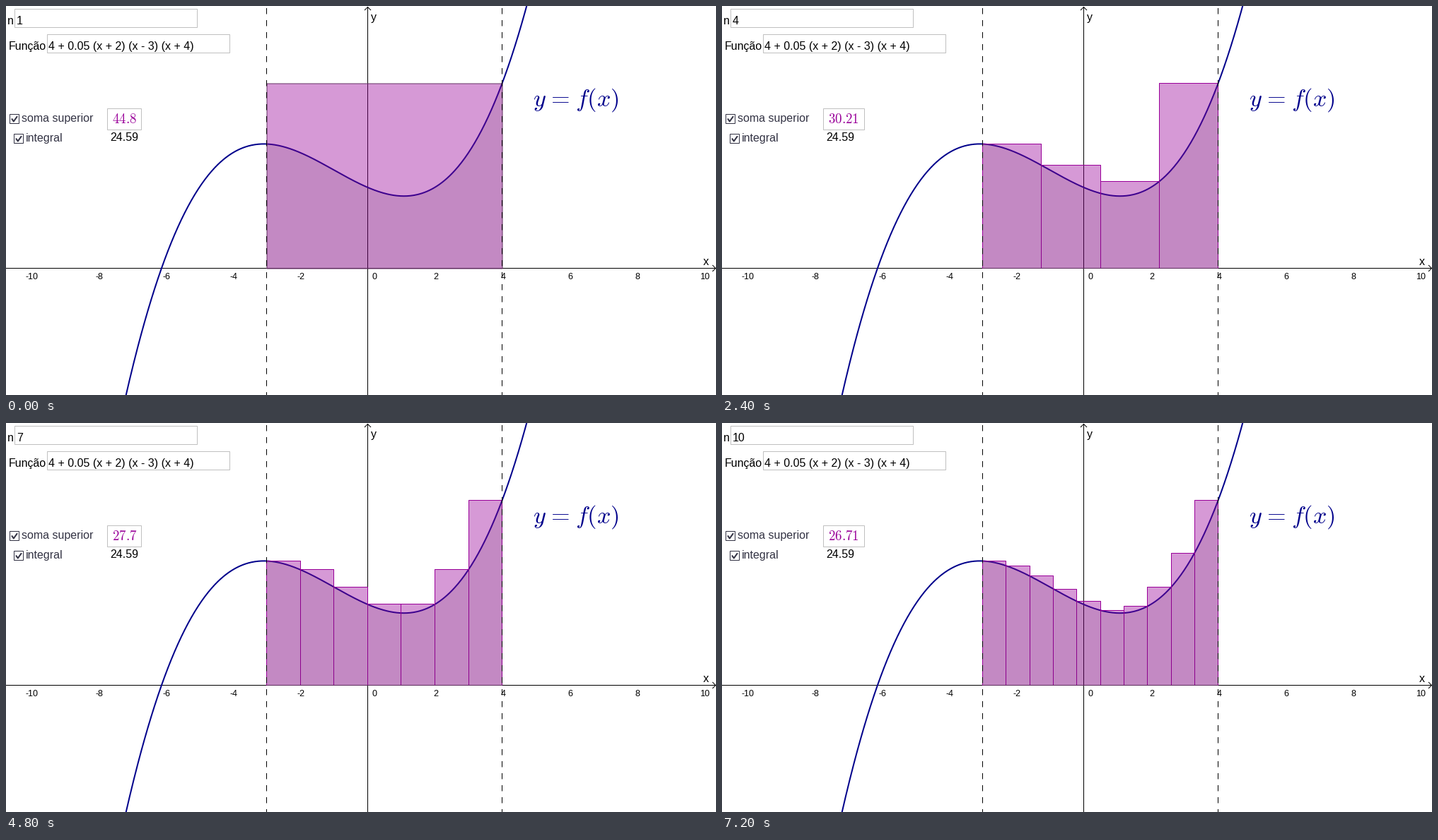
Write a matplotlib script that moves like this. It is 1004 px wide and 551 px high and loops after 8000 ms.

```python
import numpy as np
import matplotlib.pyplot as plt
from matplotlib.animation import FuncAnimation
from matplotlib.collections import PolyCollection
from matplotlib.patches import Rectangle

W, H, DPI = 1004, 551, 64
PX = 72 / DPI                      # points per pixel
OX, OY = 511.3, 371.5              # origin of the plot
SX, SY = 333 / 7, 262 / 6.4        # pixels per unit
A, B = -3, 4
STEPS = 10
NAVY, PURPLE, DARK, GRAY = "#00008b", "#990099", "#333344", "#c0c0c0"

plt.rcParams.update({
    "font.family": "Liberation Sans",
    "mathtext.fontset": "cm",
    "path.snap": False,
    "toolbar": "None",
})

fig = plt.figure(figsize=(W / DPI, H / DPI), dpi=DPI, facecolor="white")
ax = fig.add_axes([0, 0, 1, 1])
ax.set(xlim=(0, W), ylim=(H, 0))
ax.axis("off")


def f(x):
    return 4 + 0.05 * (x + 2) * (x - 3) * (x + 4)


def px(x):
    return OX + SX * np.asarray(x, float)


def py(y):
    return OY - SY * np.asarray(y, float)


def mid(v):
    """Centre of the pixel holding v, for crisp 1px lines."""
    return np.floor(v) + 0.5


def line(xs, ys, color="black", width=1, z=1, **kw):
    kw.setdefault("solid_capstyle", "butt")
    return ax.plot(xs, ys, color=color, lw=width * PX, zorder=z, **kw)[0]


def label(x, y, s, size=16, color="black", **kw):
    return ax.text(x, y, s, fontsize=size * PX, color=color,
                   va="baseline", zorder=8, **kw)


def box(x0, y0, x1, y1, color=GRAY, width=1):
    return ax.add_patch(Rectangle((x0 + 0.5, y0 + 0.5), x1 - x0, y1 - y0,
                                  fc="white", ec=color, lw=width * PX,
                                  zorder=7))


def checkbox(x, y, text):
    box(x, y, x + 13, y + 13, DARK)
    line([x + 3, x + 5.8, x + 11], [y + 6.5, y + 10.5, y + 3.2],
         DARK, 2, z=8)
    label(x + 17, y + 11, text, color=DARK)


# Axes
line([0, W - 1], [OY, OY])
line([511.5, 511.5], [1, H])
line([999, 1003.5, 999], [367, OY, 376])
line([507, 511.5, 516], [6, 1.5, 6])
for t in range(-10, 11, 2):
    label(px(t) + (9.5 if t == 0 else 1.2), 387, str(t), 12.5, ha="center")
label(986, 367, "x")
label(516, 21, "y")

# Curve, area under it and the interval limits
xs = np.linspace(-7.4, 5, 500)
line(px(xs), py(f(xs)), NAVY, 2, z=2)
xs = np.linspace(A, B, 200)
ax.fill_between(px(xs), py(f(xs)), OY, color="#220022", alpha=0.1, lw=0,
                zorder=4)
line(px([A, B]), [OY, OY], "#5c2a5c", z=5)
for limit in (A, B):
    x = mid(px(limit) + 0.1)
    line([x, x], [3, H], z=5, dashes=(8.5, 8.5), dash_capstyle="butt")
label(745, 142, r"$y\hspace{0.078}=\hspace{0.078}f(x)$", 34.2, NAVY)

# Controls
label(2, 26, "n")
box(12, 4, 270, 30)
n_text = label(15, 26, "")
label(4, 62, "Função")
box(58, 40, 316, 66)
label(60, 62, "4 + 0.05 (x + 2) (x - 3) (x + 4)")
checkbox(5, 153, "soma superior")
checkbox(11, 181, "integral")
label(147, 191, "24.59")
sum_box = box(143, 145, 191, 175)
sum_text = label(150, 166, "", 19, PURPLE)

bars = PolyCollection([], facecolors=[(0.6, 0, 0.6, 0.4)],
                      linewidths=PX, zorder=3)
ax.add_collection(bars, autolim=False)


def draw(i):
    n = i + 1
    edges = np.linspace(A, B, n + 1)
    # No interior maximum on [A, B], so the ends of each piece decide.
    tops = np.maximum(f(edges[:-1]), f(edges[1:]))
    total = f"{round(tops.sum() * (B - A) / n, 2):g}"

    ex, ty = mid(px(edges) + 0.1), mid(py(tops) + 0.1)
    bars.set_verts([[(l, OY), (l, t), (r, t), (r, OY)]
                    for l, r, t in zip(ex[:-1], ex[1:], ty)])
    bars.set_edgecolor("#663366" if n < 3 else PURPLE)

    n_text.set_text(str(n))
    sum_text.set_text(f"${total}$")
    sum_box.set_width(48 if len(total) == 4 else 58)
    return bars, n_text, sum_text, sum_box


anim = FuncAnimation(fig, draw, frames=STEPS, interval=800, repeat=True,
                     repeat_delay=0, blit=False)
plt.show()
```
